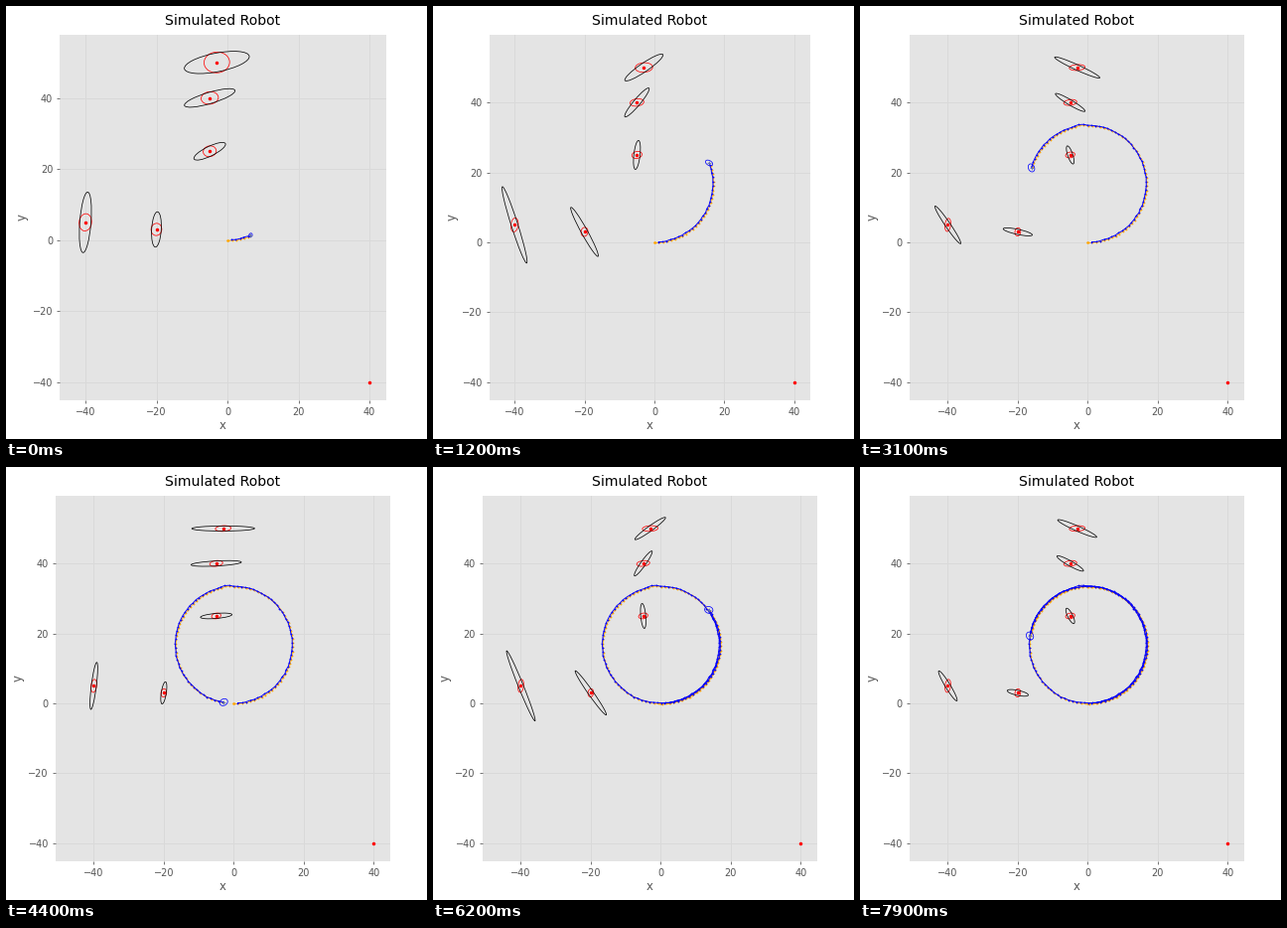
A matplotlib script that plays this animation: 424 by 436 pixels, repeating every 8 s.

```python
import numpy as np
import matplotlib.pyplot as plt
from matplotlib.animation import FuncAnimation
from matplotlib.patches import Circle, Ellipse

W, H, DPI = 424, 436, 64
PX = 72 / DPI                      # points per pixel
TOP, BOTTOM, MID = 29, 397, 218.5  # axes box in pixels
FRAMES, STEP = 80, 100
HOLDS = np.array([7, 20, 37, 56, 66, 73])  # frames that repeat the pose before
SENSE = 8                          # ticks between two observations
RADIUS, CY = 16.72, 16.8
THIN = 0.75 * PX

LANDMARKS = [(-3, 50), (-5, 40), (-5, 25), (-40, 5), (-20, 3)]
BEACON = (40, -40)

plt.rcParams.update({
    "font.family": "DejaVu Sans",
    "axes.facecolor": "#e4e4e4", "axes.edgecolor": "none",
    "axes.axisbelow": True,
    "axes.labelcolor": "#555555", "axes.labelsize": 11.67 * PX,
    "axes.titlesize": 14 * PX, "axes.titlepad": 10 * PX,
    "axes.grid": True, "grid.color": "#d9d9d9",
    "grid.linestyle": "-", "grid.linewidth": PX,
})
for axis in ("xtick", "ytick"):
    plt.rcParams.update({
        f"{axis}.color": "#555555", f"{axis}.labelsize": 9.72 * PX,
        f"{axis}.major.size": 3.4 * PX, f"{axis}.major.width": 0.8 * PX,
        f"{axis}.major.pad": 3.4 * PX,
    })

rng = np.random.default_rng(4)
TRAIL = np.arange(0, 11.2, 0.07)
JITTER = rng.normal(0, 0.06, TRAIL.size)


def turn(tick):
    """Angle travelled round the circle; two steps are skipped late on."""
    return 0.40 + 0.1393 * (tick + 2 * (tick > 61))


def path(phi, wobble=0):
    phi = np.asarray(phi, float)
    kink = 0.4 * np.exp(-((phi - 3.26) / 0.07) ** 2)
    second = np.where(phi > 2 * np.pi, 0.3 * np.clip(np.sin(phi), 0, 1), 0)
    r = RADIUS + kink + second + wobble
    return r * np.sin(phi), CY - r * np.cos(phi)


def limits(tick):
    """View that widens as the ellipses reach further out."""
    left = -43.05 - 3.6 * np.clip((tick - 12) / 7, 0, 1)
    top = 53.1 + 1.5 * min(tick / 6, 1)
    low, right = -40.4, 40.5
    mx, my = 0.05 * (right - left), 0.05 * (top - low)
    return left - mx, right + mx, low - my, top + my


def outline(xy, rx, ry, color, angle=0.0, zorder=3):
    """Ellipse with its angle given in radians."""
    ax.add_patch(Ellipse(xy, 2 * rx, 2 * ry, angle=np.degrees(angle),
                         fill=False, ec=color, lw=THIN, zorder=zorder))


def dot(xy, color, size, zorder):
    ax.plot(*xy, "o", color=color, ms=size * PX, mew=0, zorder=zorder)


def setup_axes(tick):
    x0, x1, y0, y1 = limits(tick)
    unit = (BOTTOM - TOP) / (y1 - y0)
    w = unit * (x1 - x0)
    ax.clear()
    ax.set_position([(MID - w / 2) / W, (H - BOTTOM) / H,
                     w / W, (BOTTOM - TOP) / H])
    ax.set_xlim(x0, x1)
    ax.set_ylim(y0, y1)
    ax.set_xticks(range(-40, 41, 20))
    ax.set_yticks(range(-40, 41, 20))
    ax.set_xlabel("x", labelpad=2.4 * PX)
    ax.set_ylabel("y", labelpad=3.9 * PX)
    ax.set_title("Simulated Robot", color="black")
    return unit


def draw_trail(phi):
    seen = TRAIL < phi
    x, y = path(TRAIL[seen])
    ax.plot(x + 0.2, y - 0.22, "-o", color="orange", lw=THIN,
            ms=1.8 * PX, mew=0, zorder=4)
    dot((0, 0), "orange", 2.6, 4)
    x, y = path(np.append(TRAIL[seen][1:], phi),
                np.append(JITTER[seen][1:], 0))
    ax.plot(x, y, "-+", color="blue", lw=0.9 * PX, ms=2.8 * PX,
            mew=0.7 * PX, zorder=5)


def draw_landmark(mark, robot, tick, sensing):
    lx, ly = mark
    reach = np.hypot(lx, ly)
    # map error shrinks with each observation, far marks start out worse
    first = 1.5 + 1.4 * (reach / 50) ** 8
    last = tick - tick % SENSE
    error = 0.8 + (first - 0.8) * np.exp(-last / 6)
    outline(mark, error, np.hypot(0.042 * reach, error), "red",
            np.arctan2(ly, lx))
    dot(mark, "red", 3.5, 6)
    if sensing:
        ax.add_patch(Circle(mark, 3, fill=False, ec="green", lw=THIN,
                            zorder=3))
        ax.plot([robot[0], lx], [robot[1], ly], "-.", color="green",
                lw=THIN, zorder=3)
        dot(mark, "black", 2.4, 7)
        return
    # bearing doubt stretches the ellipse across the line of sight
    dx, dy = lx - robot[0], ly - robot[1]
    since = tick % SENSE if tick else 1
    doubt = np.hypot(0.178, 0.027 * since)
    width = 0.9 * error
    outline(mark, width, np.hypot(doubt * np.hypot(dx, dy), width), "black",
            np.arctan2(dy, dx))


def draw_robot(robot, phi, unit, tick, sensing):
    scale = (0.5 if sensing else 1) / unit
    across = 2 + 2.2 * (1 - np.exp(-tick / 5))
    along = 1.6 + 1.9 * (1 - np.exp(-tick / 20))
    outline(robot, across * scale, along * scale, "blue",
            phi - 0.78 * np.pi, 6)
    ax.plot(*robot, "+", color="slategray", ms=4 * PX, mew=0.7 * PX, zorder=7)


def draw(frame):
    tick = frame - int(np.sum(HOLDS <= frame))
    sensing = tick > 0 and tick % SENSE == 0
    unit = setup_axes(tick)
    phi = turn(tick)
    robot = path(phi)
    for mark in LANDMARKS:
        draw_landmark(mark, robot, tick, sensing)
    dot(BEACON, "red", 3.5, 6)
    draw_trail(phi)
    draw_robot(robot, phi, unit, tick, sensing)
    return []


fig = plt.figure(figsize=(W / DPI, H / DPI), dpi=DPI, facecolor="white")
ax = fig.add_axes([0.1, 0.1, 0.8, 0.8])
anim = FuncAnimation(fig, draw, frames=FRAMES, interval=STEP,
                     init_func=lambda: draw(0), repeat=True, repeat_delay=0,
                     blit=False)
plt.show()
```
